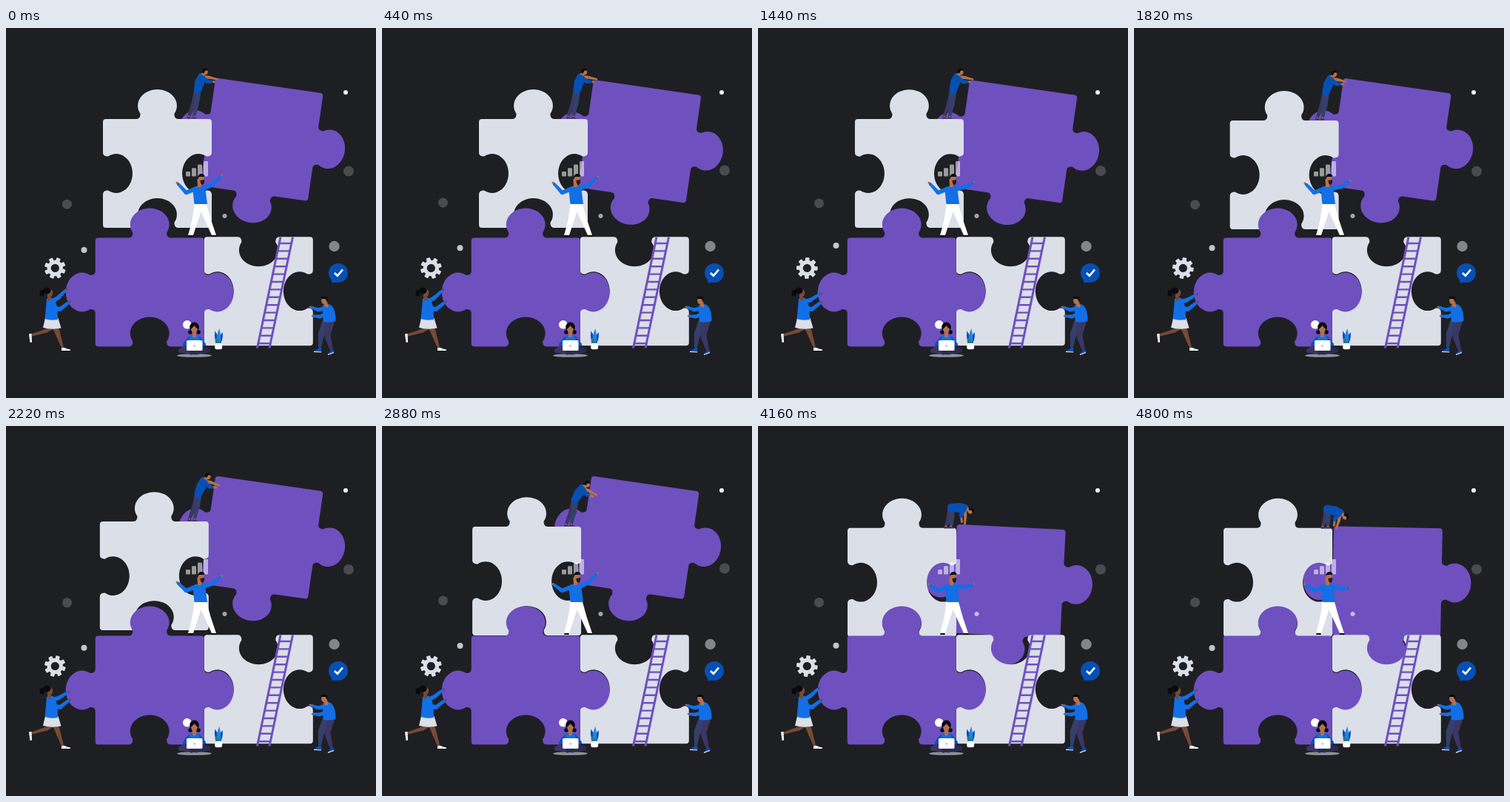
These frames come from a looping animation (500x500 px, 4.82 s). An HTML page with a canvas:

```html
<!DOCTYPE html>
<html lang="en">
<head>
<meta charset="utf-8">
<title>Puzzle team</title>
<style>
  html, body { margin: 0; width: 100%; height: 100%; overflow: hidden; background: #1e1f23; }
  canvas { display: block; width: 100vw; height: 100vh; }
</style>
</head>
<body>
<canvas id="stage"></canvas>
<script>
const LOOP = 4820, SIZE = 500, TAU = Math.PI * 2, DEG = Math.PI / 180;
const BG = '#1e1f23', PURPLE = '#6f50bf', PALE = '#dbdfe8', WHITE = '#fff';
const BLUE = '#126fe6', NAVY = '#0650b4', BLACK = '#0a0a0d';
const TAN = '#b5714a', BROWN = '#774a36', PANTS = '#3c3663', SLATE = '#34406a';

const canvas = document.getElementById('stage');
const ctx = canvas.getContext('2d');

// --- timing ---
const span = (t, a, b) => Math.min(1, Math.max(0, (t - a) / (b - a)));
const ramp = (t, a, b) => (1 - Math.cos(Math.PI * span(t, a, b))) / 2;
const pulse = (t, a, b) => (1 - Math.cos(TAU * span(t, a, b))) / 2;

// --- drawing helpers ---
const fill = (color, d) => {
  ctx.fillStyle = color;
  ctx.fill(typeof d === 'string' ? new Path2D(d) : d);
};
const oval = (color, x, y, rx, ry = rx) => {
  ctx.fillStyle = color;
  ctx.beginPath();
  ctx.ellipse(x, y, rx, ry, 0, 0, TAU);
  ctx.fill();
};
const box = (color, x, y, w, h, r = 0) => {
  ctx.fillStyle = color;
  ctx.beginPath();
  ctx.roundRect(x, y, w, h, r);
  ctx.fill();
};
const line = (color, w, d) => {
  ctx.strokeStyle = color;
  ctx.lineWidth = w;
  ctx.stroke(new Path2D(d));
};
const at = (x, y, turn, paint) => {
  ctx.save();
  ctx.translate(x, y);
  ctx.rotate(turn);
  paint();
  ctx.restore();
};
const mix = (a, b, k) => [a[0] + (b[0] - a[0]) * k, a[1] + (b[1] - a[1]) * k];
// Point at a distance from p; 0 degrees is up, 90 is right
const reach = (p, deg, len) =>
  [p[0] + len * Math.sin(deg * DEG), p[1] - len * Math.cos(deg * DEG)];

// Tapered limb through points, with a width at each point
function limb(color, points, widths) {
  points.forEach((p, i) => {
    oval(color, ...p, widths[i] / 2);
    if (!i) return;
    const q = points[i - 1], len = Math.hypot(p[0] - q[0], p[1] - q[1]) || 1;
    const nx = (q[1] - p[1]) / len / 2, ny = (p[0] - q[0]) / len / 2;
    const a = widths[i - 1], b = widths[i];
    fill(color, `M${q[0] + nx * a} ${q[1] + ny * a}L${p[0] + nx * b} ${p[1] + ny * b}` +
      `L${p[0] - nx * b} ${p[1] - ny * b}L${q[0] - nx * a} ${q[1] - ny * a}Z`);
  });
}
function arm(sleeve, skin, shoulder, elbow, hand, w, cuff = 0.8) {
  const wrist = mix(elbow, hand, cuff);
  limb(skin, [wrist, hand], [w * 0.5, w * 0.5]);
  limb(sleeve, [shoulder, elbow, wrist], [w, w * 0.9, w * 0.65]);
}

// --- puzzle pieces: sides are top, right, bottom, left; 1 knob, -1 notch, 0 flat ---
const H = 73.5;
function piece(...sides) {
  let d = `M${4 - H} ${-H}`;
  sides.forEach((s, k) => {
    const p = (x, y) => {
      for (let i = 0; i < k; i++) [x, y] = [-y, x];
      return `${x} ${y} `;
    };
    if (s) {
      const neck = -H - 7 * s, radii = k % 2 ? '22 26.4' : '26.4 22';
      d += `L${p(-28, -H)}Q${p(-23, -H)}${p(-22.9, neck)}` +
        `A${radii} 0 1 ${s > 0 ? 1 : 0} ${p(22.9, neck)}Q${p(23, -H)}${p(28, -H)}`;
    }
    d += `L${p(H - 4, -H)}Q${p(H, -H)}${p(H, 4 - H)}`;
  });
  return new Path2D(d + 'Z');
}
const upperLeft = piece(1, -1, -1, -1), upperRight = piece(0, 1, 1, 1);
const lowerLeft = piece(1, 1, -1, 1), lowerRight = piece(-1, -1, 0, -1);
const place = (shape, color, x, y, deg = 0) => at(x, y, deg * DEG, () => fill(color, shape));

// --- scene state at a time ---
function pose(t) {
  return {
    shove: pulse(t, 0, 1900),
    settle: ramp(t, 1350, 3300),
    fall: ramp(t, 2860, 4240),
    level: ramp(t, 2860, LOOP),
    swing: pulse(t, 2860, LOOP),
    crouch: ramp(t, 2800, 4700),
    lower: 9 * pulse(t, 0, 2880) + 20 * ramp(t, 2880, LOOP),
    push: (1 - Math.cos(TAU * t / 3700)) / 2
  };
}

// --- scenery ---
function ladder() {
  let rungs = '';
  for (let y = 291; y < 430; y += 10.4) rungs += `M${371 - (y - 283) * 0.2114} ${y}h16.5`;
  line(PURPLE, 3, 'M371 282.5L339.5 432.5M387.500 282.500L356 432.500');
  line(PURPLE, 2.4, rungs);
}
function gear(t) {
  at(66.3, 324.5, (20 + 90 * t / LOOP) * DEG, () => {
    for (let i = 0; i < 8; i++) {
      box(PALE, -2.8, -14.3, 5.6, 6, 1);
      ctx.rotate(TAU / 8);
    }
    oval(PALE, 0, 0, 10.7);
    oval(BG, 0, 0, 5.6);
  });
}
function tickBubble() {
  oval(NAVY, 449, 331, 13);
  fill(NAVY, 'M439 336L440.5 344.5L449 343Z');
  line(WHITE, 2.7, 'M444 331L448 334.8L455 326.5');
}
function bars() {
  for (let i = 0; i < 4; i++) {
    const h = 6.5 + i * 4.7;
    box('rgba(255,255,255,.55)', 243 + i * 8, 200.5 - h, 6, h, 1);
  }
}
function dots(t) {
  const dot = (x, y, r, alpha, bob = 0, peak = 0) =>
    oval(`rgba(255,255,255,${alpha})`, x, y - bob * Math.cos(TAU * (t - peak) / (LOOP / 2)), r);
  dot(459, 87, 3, 0.94);
  dot(463, 193, 7, 0.2, 1, 850);
  dot(82.5, 237, 6.5, 0.2, 2, 850);
  dot(105.5, 296.5, 4, 0.74, 3.5, 1130);
  dot(443.6, 295, 7.2, 0.46);
  dot(295.5, 254, 3, 0.6);
}
function plant() {
  const leaf = (color, deg, len) => at(287, 428, deg * DEG, () =>
    fill(color, `M-2 0Q-4 ${-len / 2} 0 ${-len}Q4 ${-len / 2} 2 0Z`));
  leaf(NAVY, -14, 19);
  leaf(NAVY, 19, 18);
  leaf('#2583e8', 3, 22);
  leaf('#237b80', -22, 10);
  box(WHITE, 282.3, 426, 9.8, 8.3, 2.5);
}

// --- people ---
function topMan({ shove, settle, crouch }) {
  const foot = [250 + 10 * shove + 2 * settle + 6 * crouch, 119.8 + 14.7 * settle + 1.5 * crouch];
  const hip = [foot[0] + 9 - 6 * crouch, foot[1] - 36 + 3 * settle + 9 * crouch];
  const bend = 15 + 18 * settle + 73 * crouch;
  const shoulder = reach(hip, bend, 18.5);
  const head = reach(shoulder, bend + 25, 8.5);
  const grip = 83 + bend * 1.05;
  const handA = reach(shoulder, grip, 22), handB = reach(shoulder, grip + 12, 19);

  [-3, 4].forEach((dx, i) => {
    const sole = [foot[0] + dx, foot[1]], knee = mix(hip, sole, 0.5);
    limb(i ? SLATE : PANTS, [hip, [knee[0] + 1, knee[1]], sole], [9.5, 7, 4]);
    limb(TAN, [sole, [sole[0], sole[1] + 1]], [2.5, 2.5]);
    fill(PANTS, `M${sole[0] - 2.5} ${sole[1] + 2.8}v-2.500h3l4.500 2.500Z`);
  });
  limb(TAN, [shoulder, reach(shoulder, grip - 4, 11), handA], [5, 4, 2.4]);
  limb(NAVY, [hip, mix(hip, shoulder, 0.6), shoulder], [10.5, 13, 10]);
  limb(TAN, [shoulder, mix(shoulder, head, 0.7)], [5, 4.5]);
  arm(NAVY, TAN, shoulder, reach(shoulder, grip + 28, 11), handB, 6, 0.6 - 0.4 * settle);
  oval(TAN, ...head, 3.5, 3.8);
  at(...head, (bend - 15) * DEG, () =>
    fill(BLACK, 'M-4 1Q-5.500 -4 0 -5Q3 -5 3.500 -2L0 -2L-2 2Z'));
}
function middleMan({ lower, settle }) {
  const right = [291.5, 199 + lower], left = [231, 209 + 5 * settle];
  fill(BLACK, 'M246 282l1 -3h5l1 3ZM278 282v-3h5l2 3Z');
  fill(WHITE, 'M254.500 236H270.500Q276 258 284 280H278L263.500 248L253 280H246Q253 258 254.500 236Z');
  arm(BLUE, TAN, [267, 217], [280, 211 + lower * 0.45], right, 6, 0.85);
  arm(BLUE, TAN, [257, 217], [243.5, 222.5], left, 6, 0.85);
  fill(BLUE, 'M257 214Q263 210.500 269 213L270 222L272 238H254.500L252.500 220Z');
  limb(TAN, [[261, 206], [261.5, 213]], [5, 5]);
  oval(TAN, 263.5, 204, 4, 5.5);
  fill(BLACK, 'M259 202Q260 196.500 265 197Q269 198 268 201H262Z');
  fill('#2b1a19', 'M262.500 206L268 205Q268.500 211 265.500 212Q262.500 211 262.500 206Z');
}
function leftWoman({ push }) {
  const hand = [82 + 3.5 * push, 353 + 6.5 * push];
  limb(BROWN, [[62, 404], [55, 409], [35, 415]], [7, 5, 3]);
  fill(WHITE, 'M31 413.500L34.500 413L35 424.500L32.500 425Z');
  limb(BROWN, [[67, 404], [71, 416], [76.5, 432]], [8, 6, 3]);
  fill(WHITE, 'M75 436V432.500L79 432Q83 434 87 434.500V436Z');
  fill(PALE, 'M53 392H70.500L74.500 405.500Q63 408 50 405Z');
  arm(BLUE, BROWN, [62, 370], [71, 364 + 4 * push], hand, 6);
  fill(BLUE, 'M55 366Q61 362 66 367L69.500 378L70 394Q61 396 52.500 393Z');
  arm(BLUE, BROWN, [64, 379], [73, 380], [86, 370], 6.5);
  limb(BROWN, [[58, 361], [59, 366]], [4.5, 5]);
  oval(BROWN, 59.7, 358, 3.6, 4.8);
  oval(BLACK, 55.5, 355, 5, 4.2);
  oval(BLACK, 48.8, 358, 3.6, 4.6);
}
function rightMan() {
  limb(SLATE, [[432, 398], [426, 413], [424, 431]], [10, 8.5, 4]);
  limb(PANTS, [[438, 398], [434, 414], [439.5, 434]], [11, 8.5, 4.5]);
  fill(NAVY, 'M415.500 437l8 -5l3 1v4.500ZM434 441l6 -6l4 1l-1 3Z');
  line(WHITE, 1.2, 'M416 437.500L426 438M435 441.500L443 438.500');
  arm(BLUE, TAN, [433, 378], [422, 381], [411, 377], 5.5);
  fill(BLUE, 'M428 375Q434 371 440 375Q446 382 445.500 396Q437 399 429 397L428 388Z');
  arm(BLUE, TAN, [435, 386], [424, 390], [414, 389], 5.5);
  limb(TAN, [[431, 370], [433, 375]], [5, 5]);
  oval(TAN, 430, 368.5, 3.8, 5);
  fill(BLACK, 'M426 366Q426 361.500 431 363Q436 364 434 370L431.500 366Z');
}
function laptopWoman() {
  oval('#8f9299', 254.5, 442.6, 23.5, 2.2);
  limb(PANTS, [[246, 431], [236, 436], [258, 439]], [7, 6, 5]);
  limb('#2b2c52', [[263, 431], [273, 436], [250, 439]], [7, 6, 5]);
  oval(WHITE, 244.8, 400.8, 5.8);
  fill(WHITE, 'M246 405L251 407L249 401Z');
  oval(BLACK, 254.5, 404.5, 6.3, 7);
  oval(BLACK, 249, 411, 2.8);
  oval(BLACK, 260, 411, 2.8);
  fill(NAVY, 'M247 417Q254 413 262 417L270 427Q270 430 266 430H242Q238 430 239 427Z');
  fill(BLUE, 'M248.500 416H260.500L263 426H246Z');
  limb(TAN, [[254.5, 410], [254.5, 416]], [4.5, 5]);
  oval(TAN, 254.5, 407.3, 4.3, 5.3);
  fill(BLACK, 'M249 407Q250 399 255 400Q260 400 260 407Q256 405 254.500 402Q253 405 249 407Z');
  box(WHITE, 244, 422, 21.5, 14, 1.5);
  oval('#b6a5df', 254.7, 429.5, 1.2);
}

// --- frame ---
function draw(t) {
  const now = pose(t), { shove, settle, fall, level, swing } = now;
  box(BG, 0, 0, SIZE, SIZE);
  place(upperRight, PURPLE, 345.5 + 6.2 * shove - 3.5 * fall - 4.5 * swing,
    150.7 + 5.7 * shove + 59.6 * fall, 8.2 - 7.1 * level);
  place(lowerRight, PALE, 341.3, 355.7);
  place(upperLeft, PALE, 204.5 - 10 * settle, 196.5 + 14.7 * settle);
  place(lowerLeft, PURPLE, 194.2, 357);
  ladder();
  bars();
  topMan(now);
  middleMan(now);
  leftWoman(now);
  rightMan();
  laptopWoman();
  plant();
  gear(t);
  tickBubble();
  dots(t);
}
function tick(now) {
  const ratio = window.devicePixelRatio || 1;
  const w = Math.round(innerWidth * ratio), h = Math.round(innerHeight * ratio);
  if (canvas.width !== w || canvas.height !== h) {
    canvas.width = w;
    canvas.height = h;
  }
  ctx.setTransform(w / SIZE, 0, 0, h / SIZE, 0, 0);
  draw(Math.max(0, now - start) % LOOP);
  requestAnimationFrame(tick);
}
const start = performance.now();
tick(start);
</script>
</body>
</html>
```
